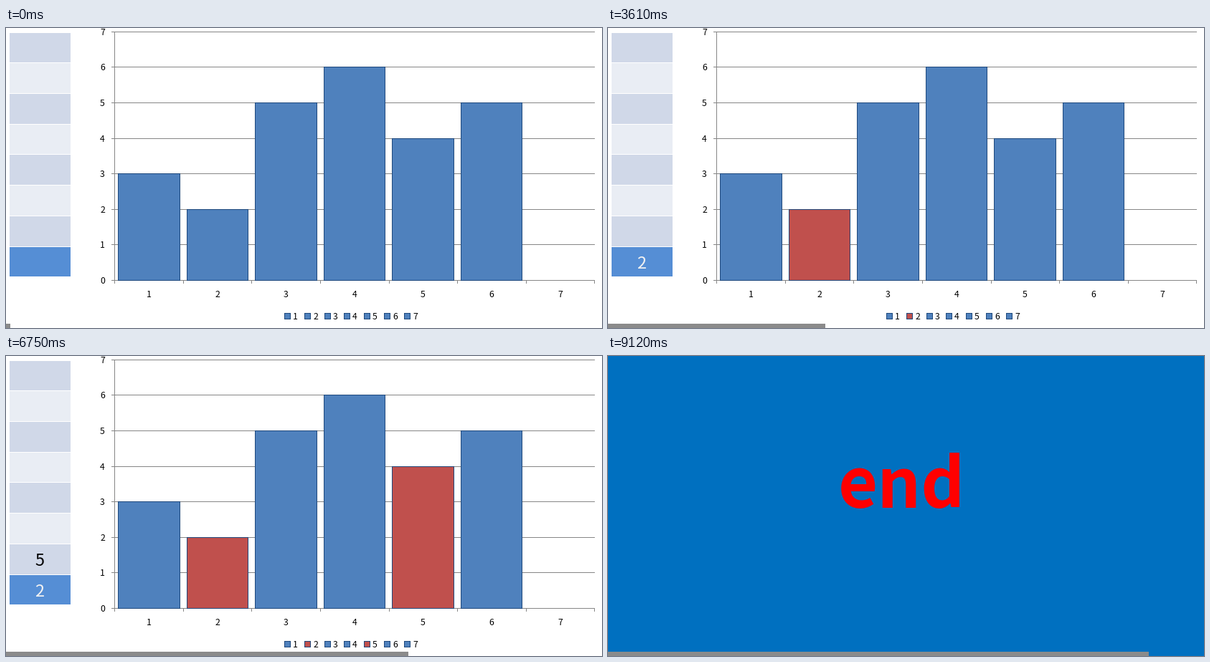
Animation of 831x419 px, one loop 9.27 s. Source, as a matplotlib script:

```python
import matplotlib.pyplot as plt
from matplotlib.animation import FuncAnimation
from matplotlib.patches import Rectangle

W, H, DPI = 831, 419, 64
LOOP, TICK = 9270, 30
STEPS = 59

BLUE, RED, EDGE, GRID = "#4F81BD", "#C0504D", "#1F497D", "#868686"
VALUES = [3, 2, 5, 6, 4, 5, 0]
# stack contents on each slide, bottom first
STACKS = [(), (1,), (2,), (2, 3), (2, 3, 4), (2, 5), (2, 5, 6)]

X0, DX = 151.3, 95.57
Y0, DY = 352.3, 49.57

fig = plt.figure(figsize=(W / DPI, H / DPI), dpi=DPI, facecolor="white")
ax = fig.add_axes([0, 0, 1, 1])
ax.set(xlim=(0, W), ylim=(H, 0))
ax.axis("off")


def box(x, y, w, h, color, z=1):
    return ax.add_patch(Rectangle((x, y), w, h, fc=color, lw=0,
                                  antialiased=False, zorder=z))


def framed(x, y, w, h):
    """Box with a one pixel border; returns the inner fill."""
    box(x, y, w, h, EDGE, 2)
    return box(x + 1, y + 1, w - 2, h - 2, BLUE, 3)


def label(x, y, s, px, color="black", z=4, **kw):
    return ax.text(x, y, s, fontsize=px * 72 / DPI, color=color, zorder=z,
                   ha="center", va="baseline",
                   family="Noto Sans CJK JP", **kw)


def step_time(n):
    return 150 * n + 20 * int(0.37 * n - 0.4)


# stack cells, top to bottom
for i in range(8):
    top, bottom = round(6.6 + 42.7 * i), round(6.6 + 42.7 * (i + 1)) - 1
    color = "#558ED5" if i == 7 else ("#D0D8E8", "#E9EDF4")[i % 2]
    box(5, top, 85, bottom - top, color)
slots = [label(46.8, 336 - 42.7 * i, "", 23.5, "#F2F2F2" if i == 0 else "black")
         for i in range(3)]

# grid and axes
for v in range(8):
    y = int(Y0 - DY * v)
    box(147, y, 674, 1, GRID)
    label(134.5, y + 5, str(v), 12.3)
    box(round(X0 + DX * v), 352, 1, 5, GRID)
box(151, 5, 1, 348, GRID)

# bars and legend
fills = []
for i, v in enumerate(VALUES):
    left = round(X0 + 4.8 + DX * i)
    right = int(X0 + 4.8 + DX * i + 86)
    top = int(Y0 - DY * v)
    key = round(387.9 + 27.8 * i)
    parts = [framed(key, 398, 9, 9)]
    if v:
        parts.append(framed(left, top, right - left + 1, 353 - top))
    fills.append(parts)
    label(X0 + DX * (i + 0.5), 376, str(i + 1), 12.3)
    label(key + 15.5, 407, str(i + 1), 12.3)

# closing slide
closing = [box(0, 0, W, H, "#0070C0", 8),
           label(409.5, 212, "end", 95, "#FF0000", 9, weight="bold")]
progress = box(0, 413, 6, 6, "#8B8B8B", 10)

TIMES = [step_time(n) for n in range(STEPS)]


def draw(k):
    t = k * TICK + 20
    n = sum(s <= t for s in TIMES) - 1
    slide = int((n + 0.9) / 8.29)
    ended = slide >= len(STACKS)
    stack = STACKS[min(slide, len(STACKS) - 1)]

    for i, slot in enumerate(slots):
        slot.set_text(str(stack[i]) if i < len(stack) else "")
    for i, parts in enumerate(fills):
        for p in parts:
            p.set_facecolor(RED if i + 1 in stack else BLUE)
    for a in closing:
        a.set_visible(ended)
    progress.set_width(round(6.3 + 12.89 * n))
    return []


anim = FuncAnimation(fig, draw, frames=LOOP // TICK, interval=TICK,
                     repeat=True, repeat_delay=0, blit=False)
plt.show()
```
